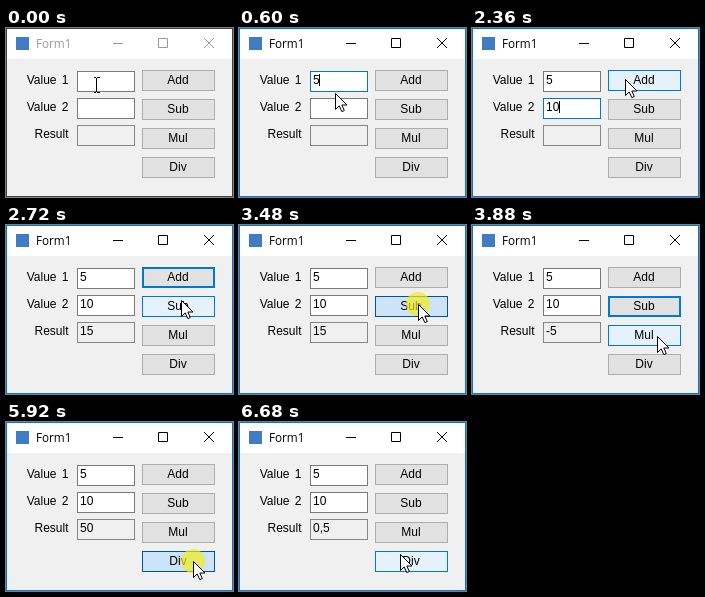
An HTML page for the animation above (6720 ms loop, 227 px wide and 169 px high).

```html
<!DOCTYPE html>
<html lang="en">
<head>
<meta charset="utf-8">
<title>Form1</title>
<style>
  html, body { margin: 0; width: 100%; height: 100%; overflow: hidden; background: #f0f0f0; }
  svg { display: block; width: 227px; height: 169px; }
  text { font: 12px "Liberation Sans", Arial, sans-serif; fill: #000; word-spacing: 2px; }
  .title { font: 11.7px "Open Sans", "Noto Sans", sans-serif; }
  .crisp { shape-rendering: crispEdges; }
</style>
</head>
<body>
<svg id="stage" viewBox="0 0 227 169" xmlns="http://www.w3.org/2000/svg"></svg>
<script>
const LOOP = 6720, STEP = 40;
const BLUE = '#0078d7', GREY = '#7a7a7a', HOT = '#171717';
const stage = document.getElementById('stage');

function add(tag, attrs, content = '', parent = stage) {
  const node = document.createElementNS('http://www.w3.org/2000/svg', tag);
  set(node, attrs);
  node.textContent = content;
  return parent.appendChild(node);
}
function set(node, attrs) {
  for (const key in attrs) node.setAttribute(key, attrs[key]);
}
function box(x, y, width, height, fill, stroke) {
  return add('rect', { x: x + .5, y: y + .5, width: width - 1, height: height - 1, fill, stroke, class: 'crisp' });
}
const label = (x, y, content, anchor = 'start') =>
  add('text', { x, y, 'text-anchor': anchor }, content);

// Window frame and title bar
add('rect', { width: 227, height: 169, fill: '#f0f0f0' });
add('rect', { width: 227, height: 31, fill: '#fff' });
add('rect', { x: 10, y: 9, width: 13, height: 13, fill: '#3f7cc4', class: 'crisp' });
const title = add('text', { x: 30, y: 20, class: 'title' }, 'Form1');
const controls = add('path', { d: 'M107 15.5h10M152.5 10.5h9v9h-9zM198 10l10 10M208 10l-10 10', fill: 'none' });
const frame = box(0, 0, 227, 169, 'none', GREY);

// Form contents
const fields = ['Value 1', 'Value 2', 'Result'].map((name, i) => {
  const y = 43 + 27 * i, editable = i < 2;
  label(62.5, y + 13, name, 'end');
  const rect = box(71, y, 58, 21, editable ? '#fff' : '#f0f0f0', editable ? GREY : '#868686');
  return { y, rect, text: label(74, y + 13, '') };
});
const buttons = ['Add', 'Sub', 'Mul', 'Div'].map((name, i) => {
  const y = 42 + 29 * i;
  const rect = box(136, y, 73, 21, '#e1e1e1', '#adadad');
  const ring = box(137, y + 1, 71, 19, 'none', BLUE);
  label(172, y + 14, name, 'middle');
  return { y, rect, ring };
});
const caret = add('rect', { width: 1, height: 12, class: 'crisp' });

// Pointer
const halo = add('circle', { r: 12, fill: '#f4ee14', 'fill-opacity': .68 });
const arrow = add('path', {
  d: 'M.5 .5v16l3.7-3.6 2.6 5.7 2.5-1.1-2.5-5.5h5.2z', fill: '#fff', stroke: '#000', 'stroke-width': 1
});
const beam = add('path', {
  d: 'M-3 -7.5h2.5M.5 -7.5h2.5M0 -7v14M-3 7.5h2.5M.5 7.5h2.5', fill: 'none', stroke: '#000', class: 'crisp'
});

const START = [90, 57];
const moves = [
  { from: 520, to: 800, end: [110, 81] },
  { from: 2040, to: 2360, end: [153, 51] },
  { from: 2640, to: 2760, end: [179, 79] },
  { from: 3640, to: 3920, end: [185, 112] },
  { from: 4600, to: 4920, end: [187, 139], linear: true },
  { from: 6360, to: 6680, end: [161, 132] }
];
const clicks = [
  { down: 320, up: 400, field: 0 },
  { down: 1120, up: 1200, field: 1 },
  { down: 2520, up: 2600, button: 0, result: '15' },
  { down: 3480, up: 3560, button: 1, result: '-5' },
  { down: 4440, up: 4520, button: 2, result: '50' },
  { down: 5920, up: 6080, button: 3, result: '0,5' }
];

const clamp = v => Math.max(0, Math.min(1, v));
const smooth = p => p * p * (3 - 2 * p);

function pointerAt(t) {
  let pos = START;
  for (const { from, to, end, linear } of moves) {
    if (t < from) break;
    const p = clamp((t - from + STEP) / (to - from + STEP));
    const k = linear ? p : smooth(p);
    pos = pos.map((v, i) => Math.round(v + (end[i] - v) * k));
  }
  return pos;
}

function mix(a, b, p) {
  const channel = (hex, i) => parseInt(hex.slice(1 + 2 * i, 3 + 2 * i), 16);
  return `rgb(${[0, 1, 2].map(i => Math.round(channel(a, i) * (1 - p) + channel(b, i) * p))})`;
}

function fieldBorder(i, t, focus, hot) {
  const rest = hot ? HOT : GREY;
  const gained = clicks[i].down, lost = clicks[i + 1].down;
  if (focus.field === i) {
    return i ? mix(HOT, BLUE, clamp((t - gained - STEP) / 120)) : BLUE;
  }
  return t >= lost ? mix(BLUE, rest, clamp((t - lost - STEP) / 120)) : rest;
}

function render(t) {
  const active = t >= 320;
  const [x, y] = pointerAt(t);
  const focus = clicks.filter(c => t >= c.down).pop() || {};
  const pressed = t < focus.up;
  const done = clicks.filter(c => c.result && t >= c.up).pop();
  const over = (left, top, w, h) => x >= left && x < left + w && y >= top && y < top + h;

  set(frame, { stroke: active ? BLUE : '#434343' });
  title.style.fill = active ? '#000' : '#999';
  set(controls, { stroke: active ? '#000' : '#999' });

  const values = [
    t >= 480 ? '5' : '',
    t >= 1880 ? '10' : t >= 1400 ? '1' : '',
    done ? done.result : ''
  ];
  let onField = false;
  fields.forEach(({ y: top, rect, text }, i) => {
    const hot = over(71, top, 58, 21);
    onField = onField || hot;
    text.textContent = values[i];
    if (i < 2) set(rect, { stroke: fieldBorder(i, t, focus, hot && active) });
  });

  buttons.forEach(({ y: top, rect, ring }, i) => {
    const hot = over(136, top, 73, 21), focused = focus.button === i;
    const down = focused && pressed;
    set(rect, {
      fill: down ? '#cce4f7' : hot ? '#e5f1fb' : '#e1e1e1',
      stroke: down ? '#005499' : hot || focused ? BLUE : '#adadad'
    });
    set(ring, { visibility: focused && !hot ? 'visible' : 'hidden' });
  });

  const typing = focus.field !== undefined;
  set(caret, { visibility: typing ? 'visible' : 'hidden' });
  if (typing) {
    set(caret, { x: 74 + Math.round(values[focus.field].length * 6.4), y: fields[focus.field].y + 3 });
  }

  set(halo, { cx: x, cy: y, visibility: pressed ? 'visible' : 'hidden' });
  set(arrow, { transform: `translate(${x} ${y})`, visibility: onField ? 'hidden' : 'visible' });
  set(beam, { transform: `translate(${x + .5} ${y})`, visibility: onField ? 'visible' : 'hidden' });
}

const begin = performance.now();
function tick() {
  const t = (performance.now() - begin) % LOOP;
  render(Math.floor(t / STEP) * STEP);
  requestAnimationFrame(tick);
}
tick();
</script>
</body>
</html>
```
